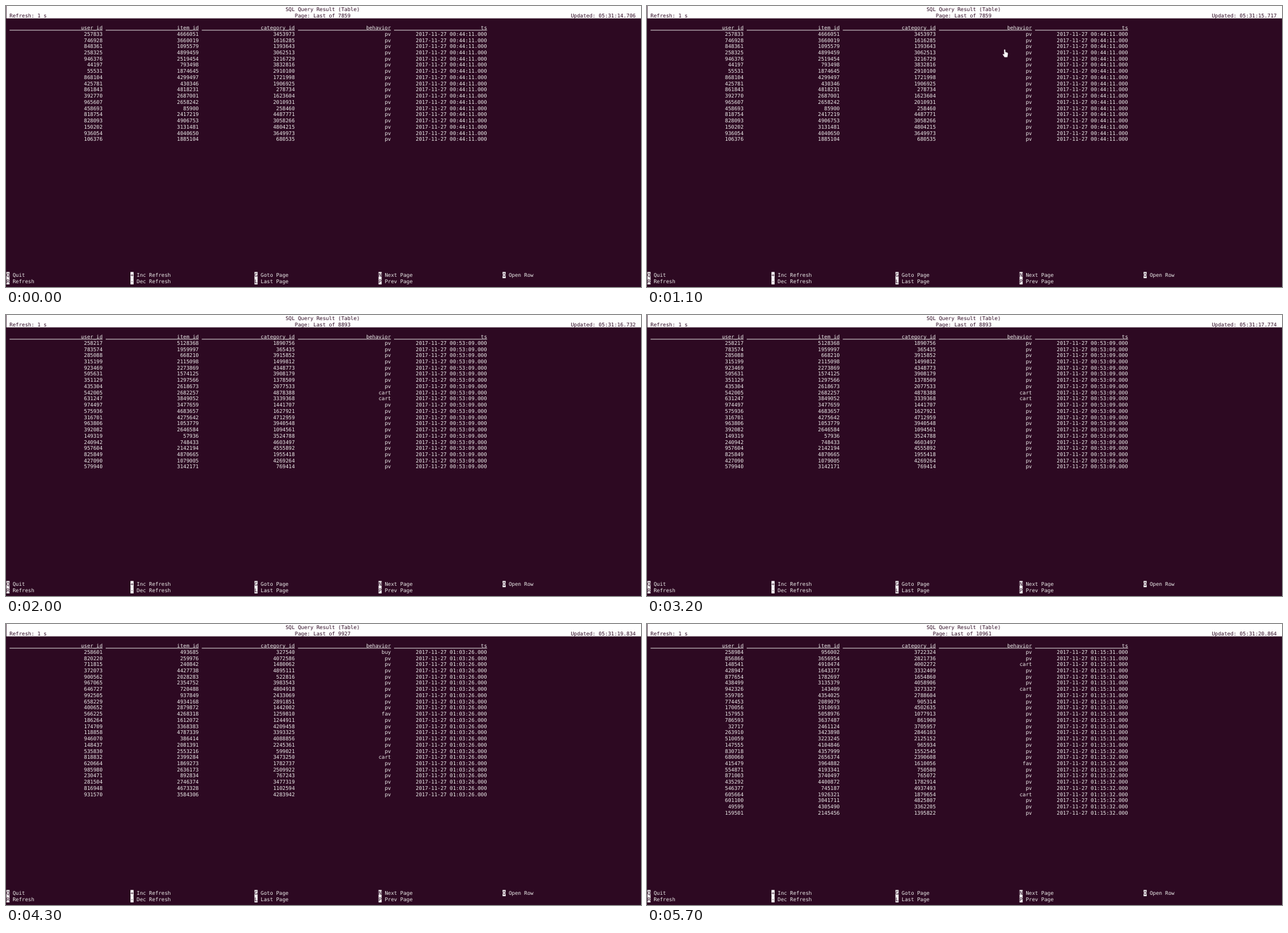
Recreate the animation shown at these times as an HTML page with a canvas. Size 1000 by 442 pixels, loop 5.8 s.

```html
<!DOCTYPE html>
<html lang="en">
<head>
<meta charset="utf-8">
<title>SQL Query Result</title>
<style>
html, body { margin: 0; width: 100%; height: 100%; overflow: hidden; background: #2d0922; }
canvas { display: block; width: 1000px; height: 442px; }
</style>
</head>
<body>
<canvas id="stage" width="1000" height="442"></canvas>
<script>
const ctx = document.getElementById('stage').getContext('2d');
const LOOP = 5800, STEP = 100;
const CELL_W = 4.883, CELL_H = 9.73, LEFT = 0.7;
const BG = '#2d0922', FG = '#eeeeec', BAR = '#fefefe';
const COLUMNS = ['user_id', 'item_id', 'category_id', 'behavior', 'ts'];
const KEYS = [
  ['Q', 'Quit', 'R', 'Refresh'],
  ['+', 'Inc Refresh', '-', 'Dec Refresh'],
  ['G', 'Goto Page', 'L', 'Last Page'],
  ['N', 'Next Page', 'P', 'Prev Page'],
  ['O', 'Open Row']
];

// The event time of each page and the rows whose behavior is not "pv".
const PAGES = [
  { time: () => '00:44:11', marks: {} },
  { time: () => '00:53:09', marks: { 8: 'cart', 9: 'cart' } },
  { time: () => '01:03:26', marks: { 0: 'buy', 10: 'fav', 17: 'cart' } },
  { time: row => row < 16 ? '01:15:31' : '01:15:32',
    marks: { 2: 'cart', 6: 'cart', 18: 'fav', 23: 'cart' } }
].map(buildPage);

const UPDATES = [
  { at: 0, page: 0, clock: '14.706' },
  { at: 200, page: 0, clock: '15.717' },
  { at: 1200, page: 1, clock: '16.732' },
  { at: 2200, page: 1, clock: '17.774' },
  { at: 3300, page: 2, clock: '18.822' },
  { at: 4300, page: 2, clock: '19.834' },
  { at: 5400, page: 3, clock: '20.864' }
];

function seeded(seed) {
  return () => {
    seed = (seed * 1664525 + 1013904223) % 4294967296;
    return seed / 4294967296;
  };
}

// Every page is three rows longer and 1034 pages further on than the one before.
function buildPage({ time, marks }, index) {
  const random = seeded(index + 29);
  const id = (min, max) => String(Math.floor(min + random() * (max - min)));
  const rows = Array.from({ length: 18 + 3 * index }, (_, row) => [
    id(13000, 1003000),
    id(33000, 5130000),
    id(102000, 5060000),
    marks[row] || 'pv',
    `2017-11-27 ${time(row)}.000`
  ]);
  return { last: 7859 + 1034 * index, rows };
}

const colX = col => LEFT + col * CELL_W;
const rowY = row => row * CELL_H;

function put(text, col, row, color = FG) {
  ctx.fillStyle = color;
  ctx.fillText(text, colX(col), rowY(row) + 7.9);
}

function box(x, y, w, h, color) {
  ctx.fillStyle = color;
  ctx.fillRect(x, y, w, h);
}

function drawBar(page, clock) {
  const label = 'Page: Last of ' + page.last;
  box(LEFT, 0, 1000, rowY(2), BAR);
  put('SQL Query Result (Table)', 90, 0, BG);
  put(label, Math.floor((204 - label.length) / 2), 1, BG);
  put('Refresh: 1 s', 1, 1, BG);
  put('Updated: 05:31:' + clock, 182, 1, BG);
}

function drawTable(page) {
  const putCells = (cells, row) =>
    cells.forEach((text, i) => put(text, 31 * (i + 1) - text.length, row));

  putCells(COLUMNS, 3);
  COLUMNS.forEach((_, i) => box(colX(31 * i + 1), 37.6, 30 * CELL_W, 0.9, FG));
  page.rows.forEach((cells, i) => putCells(cells, i + 4));
}

function drawKeys() {
  KEYS.forEach((group, g) => {
    for (let i = 0; i < group.length; i += 2) {
      const col = g * 40, row = 43 + i / 2;
      box(colX(col), rowY(row), CELL_W, CELL_H, BAR);
      put(group[i], col, row, BG);
      put(group[i + 1], col + 2, row);
    }
  });
}

function drawHand(t) {
  if (t < 600 || t >= 1200) return;
  const left = Math.pow(1 - Math.min(1, (t - 500) / 500), 2);
  ctx.save();
  ctx.translate(560 + 70 * left, 68 + 390 * left);
  ctx.beginPath();
  ctx.moveTo(2.3, 1);
  ctx.quadraticCurveTo(3.3, -0.4, 4.2, 1);
  ctx.lineTo(4.4, 4.6);
  ctx.lineTo(7.2, 5.2);
  ctx.quadraticCurveTo(8.6, 5.6, 8.4, 7.2);
  ctx.lineTo(7.5, 12.6);
  ctx.lineTo(3, 12.6);
  ctx.lineTo(0.2, 8.3);
  ctx.quadraticCurveTo(0.2, 6.8, 2.6, 8.2);
  ctx.closePath();
  ctx.fillStyle = '#fff';
  ctx.fill();
  ctx.restore();
}

function draw(now) {
  const t = Math.floor(now % LOOP / STEP) * STEP;
  const update = UPDATES.filter(u => u.at <= t).pop();
  const page = PAGES[update.page];
  ctx.font = '8.11px "DejaVu Sans Mono", monospace';
  ctx.textRendering = 'geometricPrecision';
  box(0, 0, 1000, 442, BG);
  drawBar(page, update.clock);
  drawTable(page);
  drawKeys();
  drawHand(t);
}

const start = performance.now();
function tick() {
  draw(performance.now() - start);
  requestAnimationFrame(tick);
}
tick();
</script>
</body>
</html>
```
